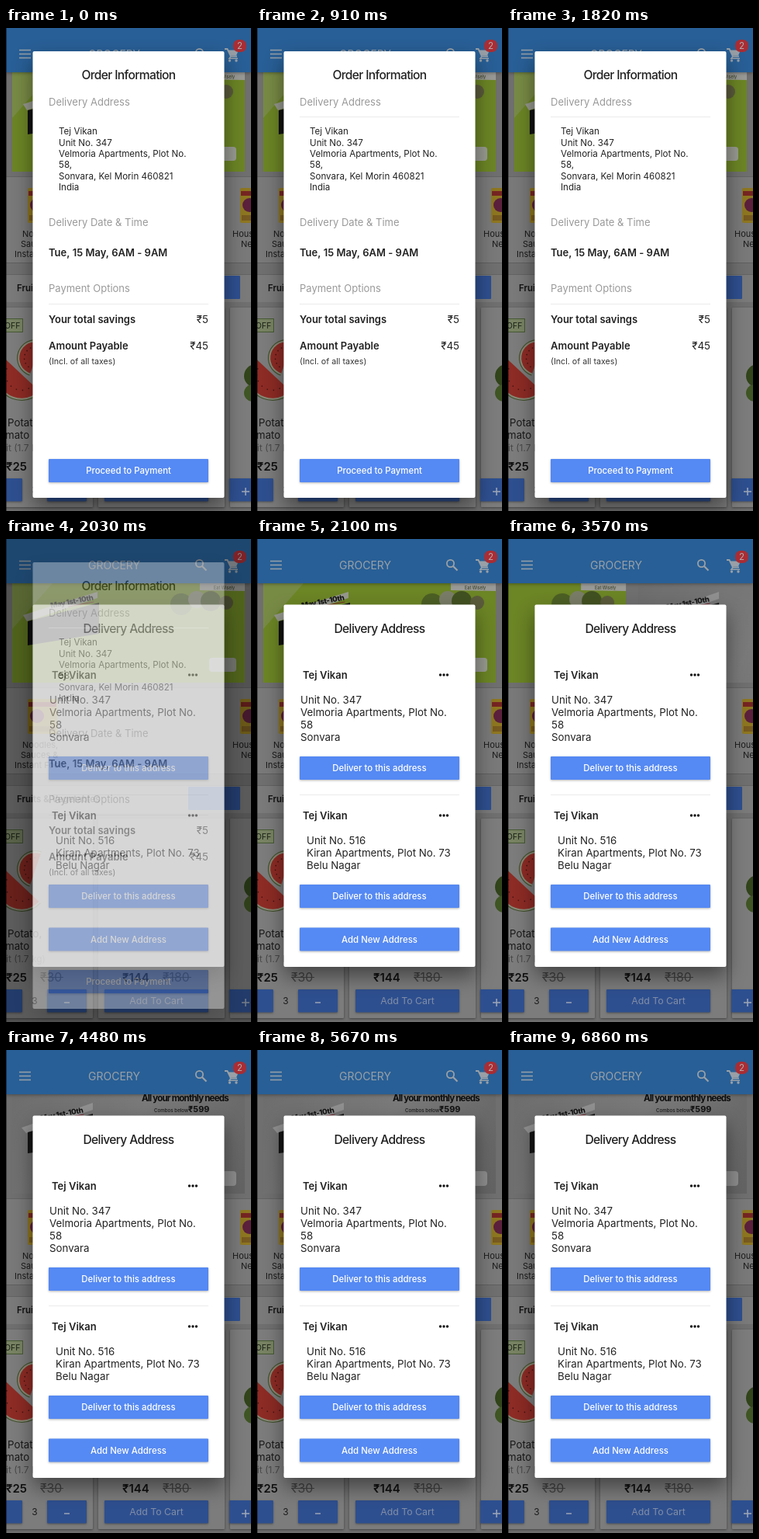
Write an HTML page with a canvas that moves like this. It is 316 px wide and 622 px high and loops after 6930 ms.

```html
<!DOCTYPE html>
<html lang="en">
<head>
<meta charset="utf-8">
<title>Grocery checkout</title>
<style>
html, body { margin: 0; width: 316px; height: 622px; overflow: hidden; background: #777; }
canvas { display: block; }
</style>
</head>
<body>
<canvas id="stage" width="316" height="622"></canvas>
<script>
const W = 316, H = 622, LOOP = 6930;
const SWITCH = 1960, SWITCHED = 2100;
const SLIDE = 3500, SLID = 3850;
const BACKDROP = .15, SWITCH_DIM = .22;
const FONT = 'Inter, Roboto, sans-serif';
const stage = document.getElementById('stage').getContext('2d');
let g = stage;

function text(str, x, y, size, color, { weight = 400, align = 'left', spacing = 0 } = {}) {
  g.font = `${weight} ${size}px ${FONT}`;
  g.letterSpacing = spacing + 'px';
  g.textAlign = align;
  g.textBaseline = 'alphabetic';
  g.fillStyle = color;
  g.fillText(str, x, y);
}

function box(x, y, w, h, color, radius = 0) {
  g.fillStyle = color;
  g.beginPath();
  g.roundRect(x, y, w, h, radius);
  g.fill();
}

function shape(color, points) {
  g.fillStyle = color;
  g.beginPath();
  points.forEach(([x, y]) => g.lineTo(x, y));
  g.closePath();
  g.fill();
}

function line(color, width, ...points) {
  g.strokeStyle = color;
  g.lineWidth = width;
  g.beginPath();
  points.forEach(([x, y]) => g.lineTo(x, y));
  g.stroke();
}

function disc(x, y, r, color) {
  g.fillStyle = color;
  g.beginPath();
  g.arc(x, y, r, 0, Math.PI * 2);
  g.fill();
}

function shadowed(alpha, blur, dy, draw) {
  g.save();
  g.shadowColor = `rgba(0,0,0,${alpha})`;
  g.shadowBlur = blur;
  g.shadowOffsetY = dy;
  draw();
  g.restore();
}

function layer(draw) {
  const canvas = document.createElement('canvas');
  canvas.width = W;
  canvas.height = H;
  g = canvas.getContext('2d');
  draw();
  g = stage;
  return canvas;
}

// Page behind the dialogs

function header() {
  const ink = '#b4bcc4';
  shadowed(.35, 4, 1, () => box(0, 0, W, 57, '#2f70b0'));
  for (const y of [28.5, 33.5, 38.5]) line(ink, 1.5, [17, y], [32, y]);
  text('GROCERY', 139.5, 39, 14, ink, { align: 'center' });

  g.strokeStyle = ink;
  g.lineWidth = 1.8;
  g.beginPath();
  g.arc(249.5, 31.5, 4.6, 0, Math.PI * 2);
  g.stroke();
  line(ink, 2.2, [253, 35], [258.5, 40.5]);

  line(ink, 1.8, [282, 27], [285.5, 27], [290, 36.5], [298, 36.5]);
  line(ink, 1.6, [290, 36.5], [288, 39.3], [299, 39.3]);
  shape(ink, [[286, 28.5], [300, 28.5], [297, 35.5], [289.5, 35.5]]);
  disc(288.5, 42, 1.7, ink);
  disc(297, 42, 1.7, ink);
  box(293, 15, 17, 16, '#c6353d', 7);
  text('2', 301.5, 27.3, 11.5, '#d8c8c8', { align: 'center' });
}

function dateTag(x, y) {
  g.save();
  g.translate(x, y);
  g.rotate(-.19);
  text('May 1st-10th', 0, 0, 9.5, '#151515', { weight: 800, spacing: -.4 });
  line('#8e2530', 1, [22, 2.5], [56, 2.5]);
  g.restore();
}

function greenBanner() {
  box(8, 57, 300, 128, '#7f9c2c');
  shape('#8da351', [[8, 57], [60, 57], [8, 116]]);
  shape('#b0b3a6', [[22, 98], [118, 68], [118, 76], [27, 106]]);
  shape('#141414', [[28, 106], [120, 82], [120, 122], [28, 137]]);
  dateTag(58, 89);
  for (const [x, y, r, color] of [
    [226, 84, 14, '#59702a'], [246, 78, 11, '#8e9379'], [264, 80, 13, '#4d5f27'], [284, 82, 9, '#6a6b45']
  ]) disc(x, y, r, color);
  shape('#b4b4b0', [[250, 57], [308, 57], [308, 67], [250, 66]]);
  text('Eat Wisely', 268, 64.5, 5.5, '#374322');
  box(262, 153, 35, 18, '#b2b6ab', 4);
}

function grayBanner() {
  const shade = g.createLinearGradient(8, 57, 308, 185);
  shade.addColorStop(0, '#808080');
  shade.addColorStop(.5, '#8f8f8f');
  shade.addColorStop(1, '#757575');
  box(8, 57, 300, 128, shade);
  shape('#a9a9a9', [[20, 100], [112, 68], [112, 77], [26, 107]]);
  shape('#171717', [[28, 106], [112, 82], [112, 122], [28, 133]]);
  dateTag(45, 91);
  text('All your monthly needs', 175, 66, 11.5, '#111', { weight: 700, spacing: -.8 });
  text('Combos below', 191, 80, 6.2, '#222', { weight: 500 });
  text('₹599', 235, 80, 11, '#141414', { weight: 700 });
  box(262, 156, 35, 19, '#a5a5a5', 4);
}

function packet(x) {
  box(x, 206, 38, 45, '#a58a25', 2);
  box(x + 1, 210, 36, 6, '#8b2b28');
  disc(x + 12, 228, 9, '#6b2647');
  box(x + 2, 241, 34, 7, '#8c6a24');
}

function categories() {
  box(0, 192, W, 110, '#8e8e8e');
  line('#747474', 1, [0, 191.5], [W, 191.5]);
  line('#707070', 1, [0, 302.5], [W, 302.5]);
  packet(28);
  packet(302);
  const ink = '#202020';
  text('Noodles,', 21, 269, 11, ink);
  text('Sauces &', 19, 282, 11, ink);
  text('Instant Food', 11, 295, 11, ink);
  text('Household', 292, 269, 11, ink);
  text('Needs', 303, 282, 11, ink);
}

function slice(x, y, r, angle) {
  g.save();
  g.translate(x, y);
  g.rotate(angle);
  for (const [radius, color] of [[r, '#4c5f35'], [r - 1.2, '#a0a08a'], [r - 3.2, '#a5332b']]) {
    g.fillStyle = color;
    g.beginPath();
    g.arc(0, 0, radius, 0, Math.PI);
    g.fill();
  }
  for (let i = 0; i < 7; i++) {
    const a = .35 + i * .4;
    disc(Math.cos(a) * r * .6, Math.sin(a) * r * .6, .8, '#4a1512');
  }
  g.restore();
}

function products() {
  const blue = '#365da8', ink = '#b4c0d6';
  line('#747474', 1, [0, 317.5], [W, 317.5]);
  box(0, 318, W, 35, '#8f8f8f');
  text('Fruits & Vegetables', 14, 338.5, 11.5, '#151515', { weight: 600 });
  box(235, 319, 67, 30, blue, 1);

  for (const [x, w] of [[-50, 162], [119, 163], [289, 162]])
    shadowed(.4, 3, 1, () => box(x, 360, w, 257, '#929292', 1));

  box(-20, 375, 41, 16, '#8d9a74');
  g.strokeStyle = '#52683c';
  g.lineWidth = 1;
  g.strokeRect(-19.5, 374.5, 41, 17);
  text('OFF', -2, 387, 10.5, '#20291a');

  slice(38, 425, 24, 1.9);
  slice(20, 446, 34, .75);
  disc(322, 448, 15, '#39501f');
  disc(318, 470, 11, '#4a6429');

  text('Potato,', 2, 512.5, 13.3, '#1d1d1d');
  text('mato', -1, 529, 13.3, '#1d1d1d');
  text('it (1.7 kg)', 0, 545, 12, '#555');
  const price = { weight: 600 };
  text('₹25', 0, 569.5, 15, '#141414', price);
  text('₹144', 150, 569.5, 15, '#141414', price);
  text('₹30', 44, 569.5, 15.8, '#4d4d4d');
  text('₹180', 202, 569.5, 15.8, '#4d4d4d');
  line('#4d4d4d', 1, [44, 564.5], [74, 564.5]);
  line('#4d4d4d', 1, [202, 564.5], [239, 564.5]);

  for (const [x, w] of [[-30, 51], [53, 51], [127, 134], [288, 50]])
    shadowed(.35, 3, 1, () => box(x, 580, w, 29.5, blue, 1));
  text('3', 37, 599, 12, '#202020', { align: 'center' });
  line(ink, 1.5, [75, 597], [82, 597]);
  line(ink, 1.6, [304, 597], [314, 597]);
  line(ink, 1.6, [309, 592], [309, 602]);
  text('Add To Cart', 194, 599, 12.3, '#97a6c4', { align: 'center' });
}

function page() {
  box(0, 0, W, H, '#828282');
  categories();
  products();
}

// Dialogs

function dialog(y, h, title, titleY) {
  shadowed(.45, 26, 12, () => box(34.5, y, 247, h, '#fff', 2));
  text(title, 158, titleY, 15.6, '#202020', { weight: 500, align: 'center', spacing: -.65 });
}

function button(label, y) {
  shadowed(.3, 3, 1, () => box(55, y, 206, 30, '#5589f3', 1));
  text(label, 158, y + 19, 11.4, '#fff', { weight: 500, align: 'center' });
}

function lines(rows, x, y, step, size) {
  rows.forEach((row, i) => text(row, x, y + i * step, size, '#222'));
}

const rule = y => box(55, y, 206, 1, '#ebebeb');

function orderDialog() {
  const bold = { weight: 600 }, right = { align: 'right' };
  dialog(30, 575, 'Order Information', 66);
  text('Delivery Address', 55, 100, 13, '#9a9a9a');
  lines(['Tej Vikan', 'Unit No. 347', 'Velmoria Apartments, Plot No.', '58,',
    'Sonvara, Kel Morin 460821', 'India'], 68, 137.3, 14.3, 11.6);
  text('Delivery Date & Time', 55, 255, 13, '#9a9a9a');
  text('Tue, 15 May, 6AM - 9AM', 55, 294, 13, '#222', bold);
  text('Payment Options', 55, 340, 13, '#9a9a9a');
  rule(355);
  text('Your total savings', 55, 380, 13, '#222', bold);
  text('₹5', 261, 380, 13.4, '#222', right);
  text('Amount Payable', 55, 414, 13, '#222', bold);
  text('₹45', 261, 414, 13.4, '#222', right);
  text('(Incl. of all taxes)', 55, 432.5, 10.7, '#333');
  button('Proceed to Payment', 555);
}

function addressEntry(y, x, rows) {
  text('Tej Vikan', 59, y + 4.5, 13, '#222', { weight: 600 });
  for (const dx of [236.5, 241, 245.5]) disc(dx, y, 1.7, '#111');
  lines(rows, x, y + 37, 16, 13.3);
}

function addressDialog() {
  dialog(84.5, 466.5, 'Delivery Address', 121);
  addressEntry(175, 56, ['Unit No. 347', 'Velmoria Apartments, Plot No.', '58', 'Sonvara']);
  button('Deliver to this address', 280);
  rule(329);
  addressEntry(356, 64, ['Unit No. 516', 'Kiran Apartments, Plot No. 73', 'Belu Nagar']);
  button('Deliver to this address', 445);
  button('Add New Address', 500.5);
}

const pageLayer = layer(page);
const headerLayer = layer(header);
const greenLayer = layer(greenBanner);
const grayLayer = layer(grayBanner);
const orderLayer = layer(orderDialog);
const addressLayer = layer(addressDialog);

const progress = (t, from, to) => Math.min(1, Math.max(0, (t - from) / (to - from)));

function fade(image, alpha) {
  if (alpha <= 0) return;
  g.globalAlpha = alpha;
  g.drawImage(image, 0, 0);
  g.globalAlpha = 1;
}

function render(t) {
  g.drawImage(pageLayer, 0, 0);

  const slide = 1 - (1 - progress(t, SLIDE, SLID)) ** 3;
  if (slide < 1) g.drawImage(greenLayer, -W * slide, 0);
  if (slide > 0) g.drawImage(grayLayer, W * (1 - slide), 0);
  g.drawImage(headerLayer, 0, 0);
  box(0, 0, 1, H, 'rgba(0,0,0,.45)');

  // Both backdrops overlap while one dialog replaces the other.
  const swap = progress(t, SWITCH, SWITCHED);
  const dim = BACKDROP + SWITCH_DIM * Math.sin(Math.PI * swap);
  box(0, 0, W, H, `rgba(0,0,0,${dim})`);

  fade(addressLayer, swap ** .7);
  const orderAlpha = (1 - swap) ** 1.5;
  fade(orderLayer, orderAlpha);
  if (t >= 70 && orderAlpha > 0) {
    g.globalAlpha = orderAlpha;
    rule(114);
    g.globalAlpha = 1;
  }
}

function tick() {
  render(performance.now() % LOOP);
  requestAnimationFrame(tick);
}
tick();
</script>
</body>
</html>
```
